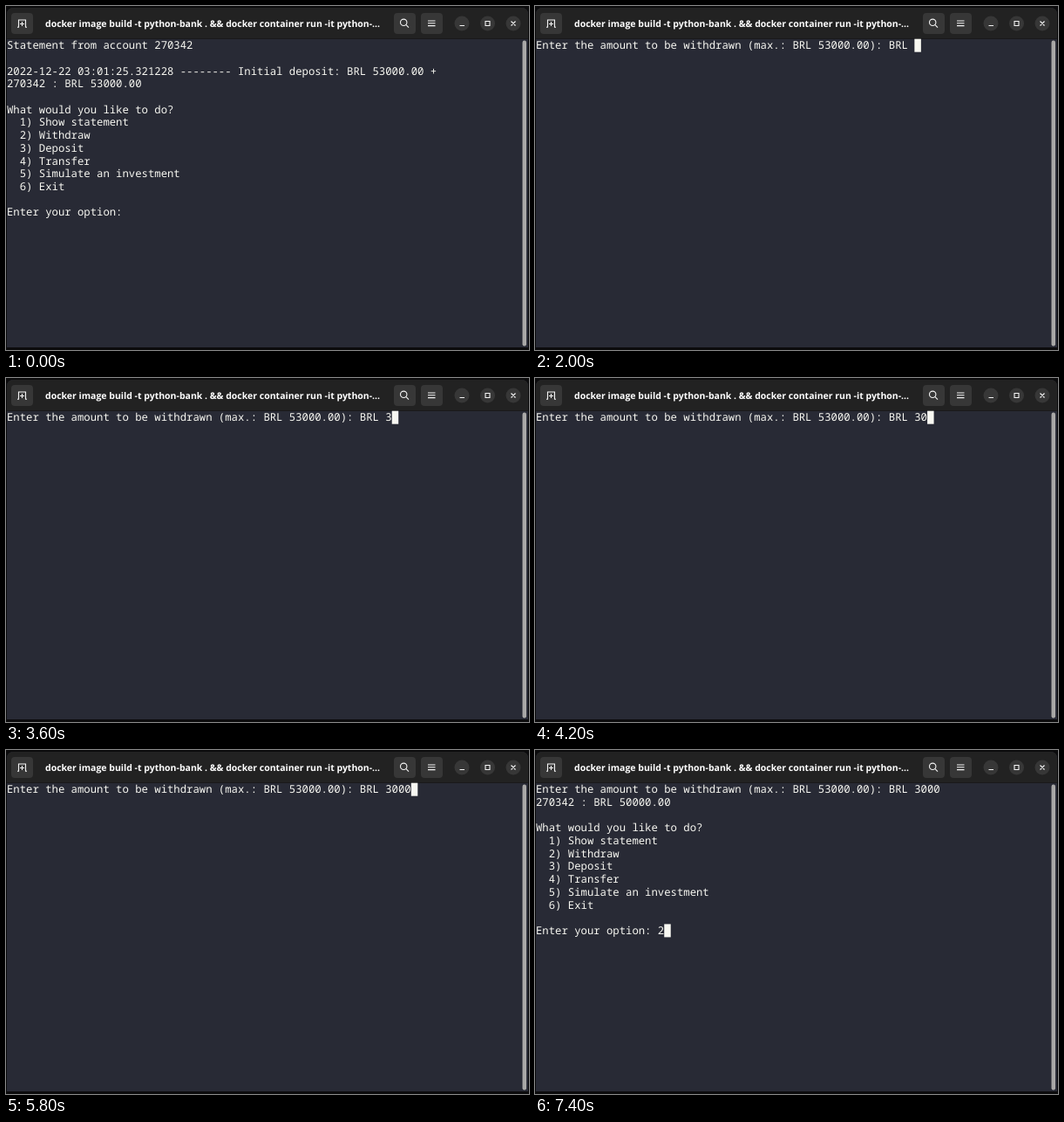
An HTML page that plays this animation: 600 by 394 pixels, repeating every 8000 ms.

```html
<!DOCTYPE html>
<html lang="en">
<head>
<meta charset="utf-8">
<style>
  html, body { margin: 0; width: 100%; height: 100%; overflow: hidden; background: #0b0b0c; }
  svg { display: block; }
  text { white-space: pre; text-rendering: geometricPrecision; }
  #screen { font: 12.27px "Noto Sans Mono", monospace; fill: #f8f8f2; }
  .title { font: bold 10.5px "Open Sans", sans-serif; fill: #fff; }
  .button { fill: #373737; }
  .icon { fill: none; stroke: #f4f4f4; stroke-width: 1.1; }
</style>
</head>
<body>
<svg width="600" height="394" viewBox="0 0 600 394">
  <path d="M1 391V10Q1 2 9 2H591Q599 2 599 10V391Z" fill="#282a35"/>
  <path d="M1 37V10Q1 2 9 2H591Q599 2 599 10V37Z" fill="#222"/>
  <path d="M1 37.5H599" stroke="#19191b"/>
  <rect x="592.5" y="39.5" width="4.5" height="350" rx="2.2" fill="#a9a8a7"/>

  <g class="button">
    <rect x="6" y="8" width="25" height="24" rx="4"/>
    <rect x="445" y="8" width="25" height="24" rx="4"/>
    <rect x="476" y="8" width="25" height="24" rx="4"/>
    <circle cx="523" cy="20" r="8.5"/>
    <circle cx="552.5" cy="20" r="8.5"/>
    <circle cx="582" cy="20" r="8.5"/>
  </g>
  <g class="icon">
    <path d="M13 24.3H14.5V16H22.5V24.3H24M18.5 18V23M16 20.5H21"/>
    <circle cx="456.2" cy="18.8" r="3.7"/>
    <path d="M459 21.6L462 24.6M484 17H492.5M484 19.8H492.5M484 22.6H492.5"/>
    <path d="M520.5 22.5H526M550 17.5H555V22.5H550ZM579.5 17.5L584.5 22.5M584.5 17.5L579.5 22.5"/>
  </g>
  <text class="title" x="45" y="23.7">docker image build -t python-bank . &amp;&amp; docker container run -it python-...</text>

  <g id="screen"></g>
  <rect id="cursor" width="7.5" height="15" fill="#f8f8f2"/>
</svg>
<script>
const LOOP = 8000, CHAR = 7.362, ROW = 14.7;
const screen = document.getElementById("screen");
const cursor = document.getElementById("cursor");

const menu = `

What would you like to do?
  1) Show statement
  2) Withdraw
  3) Deposit
  4) Transfer
  5) Simulate an investment
  6) Exit

Enter your option: `;
const statement = `Statement from account 270342

2022-12-22 03:01:25.321228 -------- Initial deposit: BRL 53000.00 +
270342 : BRL 53000.00` + menu;
const amount = "Enter the amount to be withdrawn (max.: BRL 53000.00): BRL ";
const balance = amount + "3000\n270342 : BRL 50000.00" + menu;

// start time, text, cursor visible
const steps = [
  [0, statement, false],
  [600, statement, true],
  [1200, statement, false],
  [1400, statement + "2", true],
  [2000, amount, true],
  [2600, amount, false],
  [3200, amount, true],
  [3600, amount + "3", true],
  [4200, amount + "30", true],
  [4400, amount + "3000", true],
  [5000, amount + "3000", false],
  [5600, amount + "3000", true],
  [6200, balance, true],
  [6800, balance, false],
  [7400, balance + "2", true]
];

let shown;
function show(step) {
  if (step === shown) return;
  shown = step;
  const [, text, cursorOn] = step;
  const lines = text.split("\n");
  const last = lines.length - 1;
  screen.innerHTML = lines
    .map((line, row) => `<text x="1" y="${49.2 + row * ROW}">${line}</text>`)
    .join("");
  cursor.setAttribute("x", 1 + lines[last].length * CHAR);
  cursor.setAttribute("y", 37.7 + last * ROW);
  cursor.setAttribute("visibility", cursorOn ? "visible" : "hidden");
}

const start = performance.now();
function frame() {
  const time = (performance.now() - start) % LOOP;
  show(steps.findLast(([from]) => from <= time));
  requestAnimationFrame(frame);
}
frame();
</script>
</body>
</html>
```
